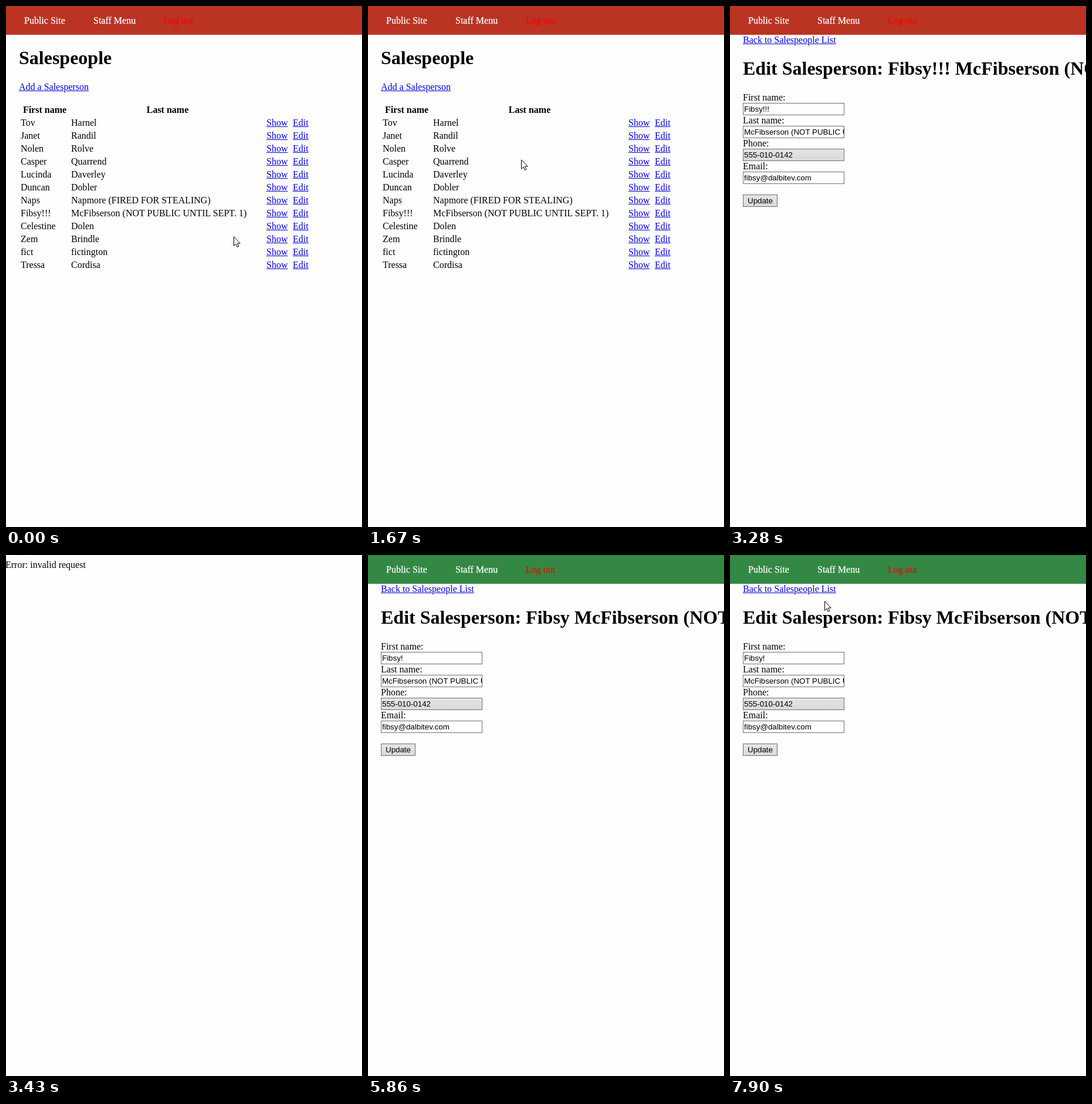
An HTML page that plays this animation: 607x887 px, repeating every 8 s.

```html
<!DOCTYPE html>
<html lang="en">
<head>
<meta charset="utf-8">
<title>Salespeople</title>
<style>
html, body { margin: 0; width: 100%; height: 100%; overflow: hidden; background: #fefefe; }
body { position: relative; color: #000; font: 16px "Liberation Serif", serif; white-space: nowrap; }
.page { position: absolute; inset: 0; overflow: hidden; visibility: hidden; animation: 8s step-end infinite; }
nav { position: absolute; width: 100%; height: 49px; background: #b32; color: #fff; -webkit-text-stroke: .25px; }
.staging nav { background: #384; }
nav span { position: absolute; top: 16px; }
main { position: absolute; top: 49px; left: 22px; display: flow-root; }
h1 { font-size: 32px; margin: 21.44px 0; }
.link { color: #00e; text-decoration: underline; }
table { margin-top: 18px; width: 506px; table-layout: fixed; border-spacing: 2px; }
th, td { padding: 1px; }
td { text-align: left; }
.field, .button {
  box-sizing: border-box; height: 21px; border: 1px solid #707070; background: #fff;
  font: 13.333px/19px "Liberation Sans", sans-serif; overflow: hidden;
}
.field { width: 173px; padding: 0 1px; }
.button { width: 59px; margin-top: 18px; text-align: center; }
.gray { background: linear-gradient(#e4e4e4, #d9d9d9); }
.error { position: absolute; left: -1px; top: 8px; }

#list { animation-name: list; }
#edit { animation-name: edit; }
#invalid { animation-name: invalid; }
#second { animation-name: second; }
@keyframes list { 0% { visibility: visible } 41%, 100% { visibility: hidden } }
@keyframes edit { 0% { visibility: hidden } 41% { visibility: visible } 42.875%, 100% { visibility: hidden } }
@keyframes invalid { 0% { visibility: hidden } 42.875% { visibility: visible } 73.25%, 100% { visibility: hidden } }
@keyframes second { 0% { visibility: hidden } 73.25%, 100% { visibility: visible } }

.cursor { position: absolute; left: 0; top: 0; fill: #fff; stroke: #000; animation: 8s step-end infinite; }
#arrow { animation-name: arrow; }
#hand { animation-name: hand; }
@keyframes arrow {
  0% { transform: translate(388px, 392px) }
  1.75% { transform: translate(338px, 412px) }
  3.375% { transform: translate(367px, 390px) }
  5.25% { transform: translate(415px, 372px) }
  6.75% { transform: translate(-99px, 0) }
  15.5% { transform: translate(501px, 353px) }
  17.375% { transform: translate(-99px, 0) }
  19.25% { transform: translate(350px, 305px) }
  20.875% { transform: translate(261px, 261px) }
  24.375% { transform: translate(266px, 253px) }
  26.25% { transform: translate(286px, 126px) }
  28.125% { transform: translate(301px, 108px) }
  30% { transform: translate(292px, 64px) }
  31.875% { transform: translate(-99px, 0) }
  58% { transform: translate(148px, -14px) }
  59.625% { transform: translate(-99px, 0) }
  82.375% { transform: translate(230px, -2px) }
  84.375% { transform: translate(240px, -2px) }
  86.125% { transform: translate(-99px, 0) }
  97% { transform: translate(161px, 77px) }
  98.75%, 100% { transform: translate(161px, 78px) }
}
@keyframes hand {
  0% { transform: translate(-99px, 0) }
  6.75% { transform: translate(446px, 359px) }
  8.625% { transform: translate(484px, 355px) }
  10.25% { transform: translate(495px, 353px) }
  15.5% { transform: translate(-99px, 0) }
  17.375% { transform: translate(445px, 360px) }
  19.25% { transform: translate(-99px, 0) }
  80.5% { transform: translate(198px, 18px) }
  82.375%, 100% { transform: translate(-99px, 0) }
}
</style>
</head>
<body>
<section class="page" id="list"></section>
<section class="page" id="edit"></section>
<section class="page" id="invalid"><div class="error">Error: invalid request</div></section>
<section class="page staging" id="second"></section>

<svg class="cursor" id="arrow" width="12" height="19">
  <path d="M.5 .8V16.3L4 13L6.4 18.4L8.8 17.4L6.5 12.1H11.3Z"/>
</svg>
<svg class="cursor" id="hand" width="18" height="24">
  <path d="M5.5 14V2.5a1.5 1.5 0 0 1 3 0V8a1.4 1.4 0 0 1 2.8 .4a1.4 1.4 0 0 1 2.8 .6a1.4 1.4 0 0 1 2.9 1V15.5L15 19V22.3H7V20L1.2 13.6a1.6 1.6 0 0 1 2.3 -2Z"/>
  <path d="M8.5 8V12M11.3 8.5V12M14.1 9V12" fill="none"/>
</svg>

<script>
const NOTE = '(NOT PUBLIC UNTIL SEPT. 1)';
const LAST = 'McFibserson ' + NOTE;
const people = [
  ['Tov', 'Harnel'], ['Janet', 'Randil'], ['Nolen', 'Rolve'], ['Casper', 'Quarrend'],
  ['Lucinda', 'Daverley'], ['Duncan', 'Dobler'], ['Naps', 'Napmore (FIRED FOR STEALING)'],
  ['Fibsy!!!', LAST], ['Celestine', 'Dolen'], ['Zem', 'Brindle'],
  ['fict', 'fictington'], ['Tressa', 'Cordisa']
];

const link = text => `<span class="link">${text}</span>`;
const nav = `<nav><span style="left:31px">Public Site</span><span style="left:149px">Staff Menu</span>
  <span style="left:269px;color:red">Log out</span></nav>`;
const field = (label, value, style = '') =>
  `<div>${label}:</div><div class="field ${style}">${value}</div>`;
const show = (id, html) => {
  document.getElementById(id).innerHTML = `${nav}<main>${html}</main>`;
};

const row = ([first, last]) =>
  `<tr><td>${first}</td><td>${last}</td><td>${link('Show')}</td><td>${link('Edit')}</td></tr>`;

const form = (title, first) => `
  <div>${link('Back to Salespeople List')}</div>
  <h1>Edit Salesperson: ${title} ${LAST}</h1>
  ${field('First name', first)}
  ${field('Last name', LAST)}
  ${field('Phone', '555-010-0142', 'gray')}
  ${field('Email', 'fibsy@dalbitev.com')}
  <div class="button gray">Update</div>`;

show('list', `
  <h1>Salespeople</h1>
  <div>${link('Add a Salesperson')}</div>
  <table>
    <colgroup><col style="width:84px"><col style="width:331px"><col style="width:43px"><col></colgroup>
    <tr><th>First name</th><th>Last name</th><th></th><th></th></tr>
    ${people.map(row).join('')}
  </table>`);
show('edit', form('Fibsy!!!', 'Fibsy!!!'));
show('second', form('Fibsy', 'Fibsy!'));
</script>
</body>
</html>
```
